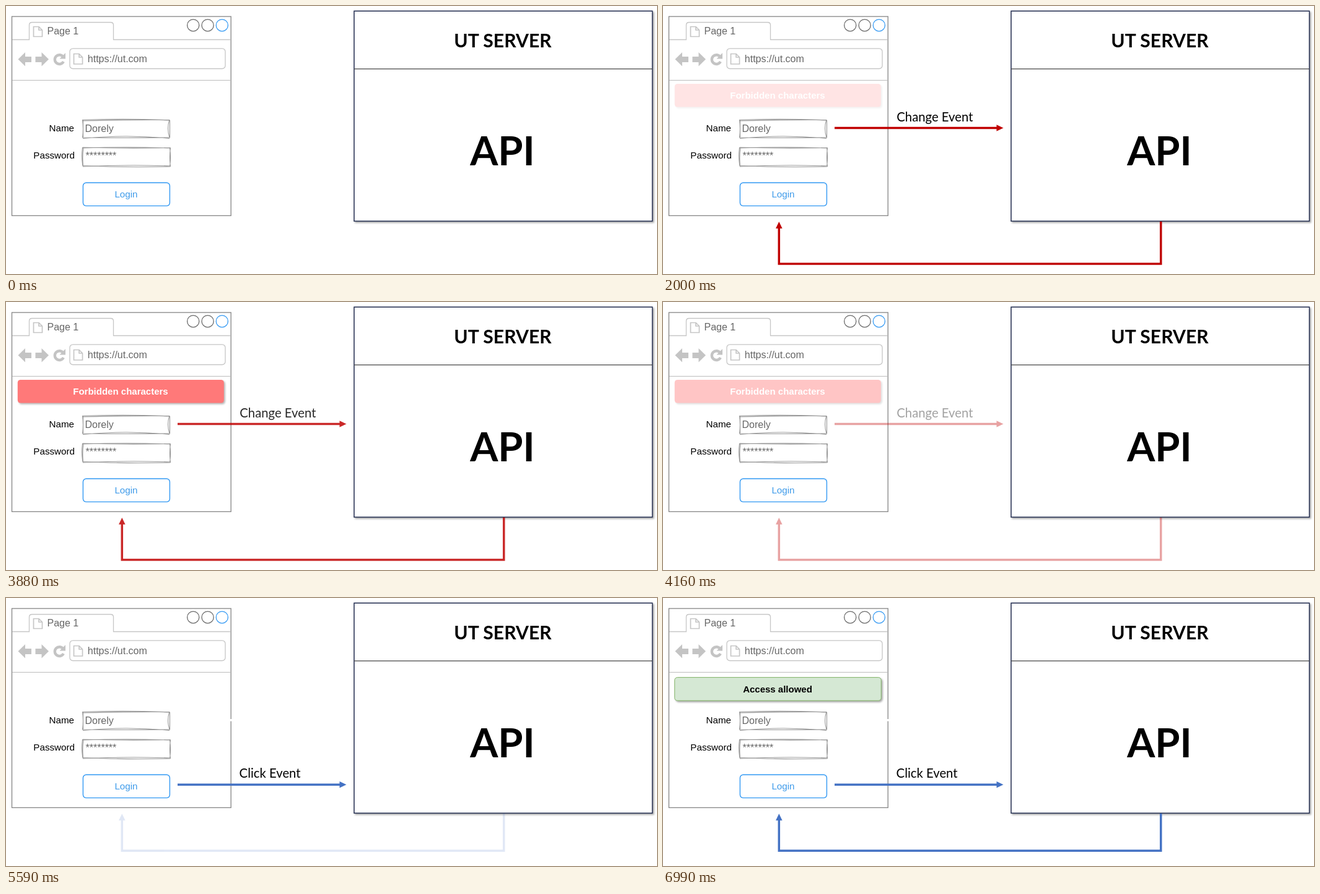
Recreate the animation shown at these times as an HTML page. Size 1051 by 434 pixels, loop 8000 ms.

```html
<!DOCTYPE html>
<html lang="en">
<head>
<meta charset="utf-8">
<title>Login events</title>
<style>
  html, body { margin: 0; width: 100%; height: 100%; overflow: hidden; background: #fff; }
  svg { display: block; width: 1051px; height: 434px; }
  text { font: 16px "Liberation Sans", Arial, sans-serif; }
  .small { font-size: 15.2px; }
  .bold { font-weight: bold; font-size: 15px; text-anchor: middle; }
  .label { font: 20.3px Lato, Carlito, sans-serif; }
  .title { font: bold 30.2px Lato, Carlito, sans-serif; text-anchor: middle; }
  .api { font-size: 65px; }
  .grey { fill: none; stroke: #c6c6c6; stroke-width: 1.3; }
  .icon { fill: none; stroke: #c6c6c6; stroke-width: 1.7; }
  .sketch { fill: none; stroke: #999; stroke-width: 1.1; }
  .dim { fill: #666; }
  .blue { stroke: #3399f3; }
  .shade { filter: drop-shadow(2px 2px 1.5px rgba(0, 0, 0, .35)); }
  .fade { opacity: 0; }
  .red { color: #c00000; }
  .navy { color: #4472c4; }
  .line { fill: none; stroke: currentColor; stroke-width: 3.5; }
  .head { fill: currentColor; }
</style>
</head>
<body>
<svg viewBox="0 0 1051 434">
  <!-- browser window -->
  <rect x="9.5" y="17" width="353.7" height="322.5" fill="#fff" stroke="#858585" stroke-width="1.3"/>
  <path class="grey" d="M10 54.5H37.5V31Q37.5 26.5 42 26.5H169Q173.5 26.5 173.5 31V54.5H363M10 120.3H363"/>
  <g fill="none" stroke="#6a6a6a" stroke-width="1.3">
    <circle cx="302.2" cy="31.2" r="9.6"/>
    <circle cx="325.6" cy="31.2" r="9.6"/>
    <circle class="blue" cx="348.8" cy="31.2" r="9.6"/>
  </g>
  <path class="icon" d="M44.5 33.5H53L58.5 39V49.5H44.5ZM53 33.5V39H58.5"/>
  <text class="dim" x="66.5" y="46">Page 1</text>
  <g fill="#c4c4c4">
    <path d="M19.5 86.3L31 75V82H41V91H31V97.5Z"/>
    <path d="M69 86.3L57.5 75V82H47.5V91H57.5V97.5Z"/>
    <path d="M96 76V85.5H86.5Z"/>
  </g>
  <path d="M92 82A7.4 7.4 0 1 0 92.8 90" fill="none" stroke="#c4c4c4" stroke-width="4.4"/>
  <rect class="grey" x="103" y="68.8" width="251" height="32.7" rx="5"/>
  <path class="icon" d="M109.5 77.5H118L123.5 83V94H109.5ZM118 77.5V83H123.5"/>
  <text class="dim" x="131.8" y="91">https://ut.com</text>

  <!-- form -->
  <text class="small" x="110" y="203" text-anchor="end">Name</text>
  <text class="small" x="111" y="247" text-anchor="end">Password</text>
  <path class="sketch" d="M123.5 184.5Q195 182 264.5 185M123.5 186Q195 184 264 184.5M123.5 184Q125.5 199 123.5 213.5M124.5 184V213.5M123.5 213Q195 214 264.5 213M124 214.5Q195 207.5 264 214.5M264.5 184.5V213.5M263.5 185Q259.5 199 264 213"/>
  <path class="sketch" d="M123.5 230Q195 227.5 265.5 230M123.5 229Q195 231 265.5 229.5M123.5 229Q121.5 244 124 259.5M125 229Q123 244 124.5 259M123.5 258.5Q195 262 265.5 260M124 260Q195 256.5 265 259M265.5 229.5Q263.5 245 265.5 260M264.5 230Q266.5 245 264.5 259.5"/>
  <text class="dim" x="127.5" y="204">Dorely</text>
  <text class="dim" x="128.5" y="248">********</text>
  <rect class="blue" x="124.4" y="286.2" width="140" height="37.4" rx="5" fill="#fff" stroke-width="1.4"/>
  <text class="small" x="194" y="310" text-anchor="middle" fill="#3f9bea">Login</text>

  <!-- server -->
  <rect class="shade" x="562" y="8.2" width="481.5" height="340.2" fill="#fff" stroke="#202b4e" stroke-width="1.5"/>
  <path d="M562 101.8H1043.5" stroke="#444" stroke-width="1.2"/>
  <text class="title" x="802" y="67">UT SERVER</text>
  <text class="title api" x="801.5" y="258">API</text>

  <rect class="fade" id="gap" x="361.5" y="196" width="3" height="3.5" fill="#fff"/>

  <!-- rejected input -->
  <g class="fade red" id="change">
    <text class="label" x="377.3" y="186.5">Change Event</text>
    <path class="line" d="M277 197.5H541"/>
    <path class="head" d="M538.5 192.2L549.5 197.5L538.5 202.8Z"/>
  </g>
  <g class="fade red" id="reject">
    <path class="line" d="M803.8 349V417.5H187.3V358"/>
    <path class="head" d="M182 360.3L187.3 349.3L192.6 360.3Z"/>
  </g>
  <g class="fade" id="error">
    <rect class="shade" x="18.8" y="126" width="333" height="37.5" rx="4.5" fill="#ff6060"/>
    <text class="bold" x="185" y="150" fill="#fff">Forbidden characters</text>
  </g>

  <!-- accepted login -->
  <g class="fade navy" id="click">
    <text class="label" x="376.6" y="291">Click Event</text>
    <path class="line" d="M277 302.3H541"/>
    <path class="head" d="M538.5 297L549.5 302.3L538.5 307.6Z"/>
  </g>
  <g class="fade navy" id="accept">
    <path class="line" d="M803.8 349V409.2H187.3V358"/>
    <path class="head" d="M182 360.3L187.3 349.3L192.6 360.3Z"/>
  </g>
  <g class="fade" id="success">
    <rect class="shade" x="18.8" y="128.6" width="333.4" height="37.6" rx="4.5" fill="#d5e8d4" stroke="#82b366"/>
    <text class="bold" x="185" y="152.7">Access allowed</text>
  </g>
</svg>
<script>
  const LOOP = 8000;
  const FIRST = 0.16; // opacity of the first fade step

  // id, then [first step, last step, step count] for fading in and out
  const fades = [
    ["change", [500, 980, 8], [3880, 4370, 8]],
    ["reject", [1180, 1740, 9], [3880, 4370, 8]],
    ["error", [2000, 2490, 8], [3880, 4370, 8]],
    ["gap", [4370, 4370, 1]],
    ["click", [5100, 5590, 8]],
    ["accept", [5590, 6080, 8]],
    ["success", [6500, 6990, 8]],
  ].map(([id, show, hide]) => ({ el: document.getElementById(id), show, hide }));

  function level(t, span) {
    if (!span || t < span[0]) return 0;
    const [from, to, count] = span;
    if (t >= to) return 1;
    const step = Math.floor((t - from) / (to - from) * (count - 1) + 1e-6);
    return FIRST + (1 - FIRST) * step / (count - 1);
  }

  function draw(now) {
    const t = now % LOOP;
    for (const { el, show, hide } of fades) {
      el.style.opacity = level(t, show) * (1 - level(t, hide));
    }
  }

  const start = performance.now();
  function tick() {
    draw(performance.now() - start);
    requestAnimationFrame(tick);
  }
  tick();
</script>
</body>
</html>
```
